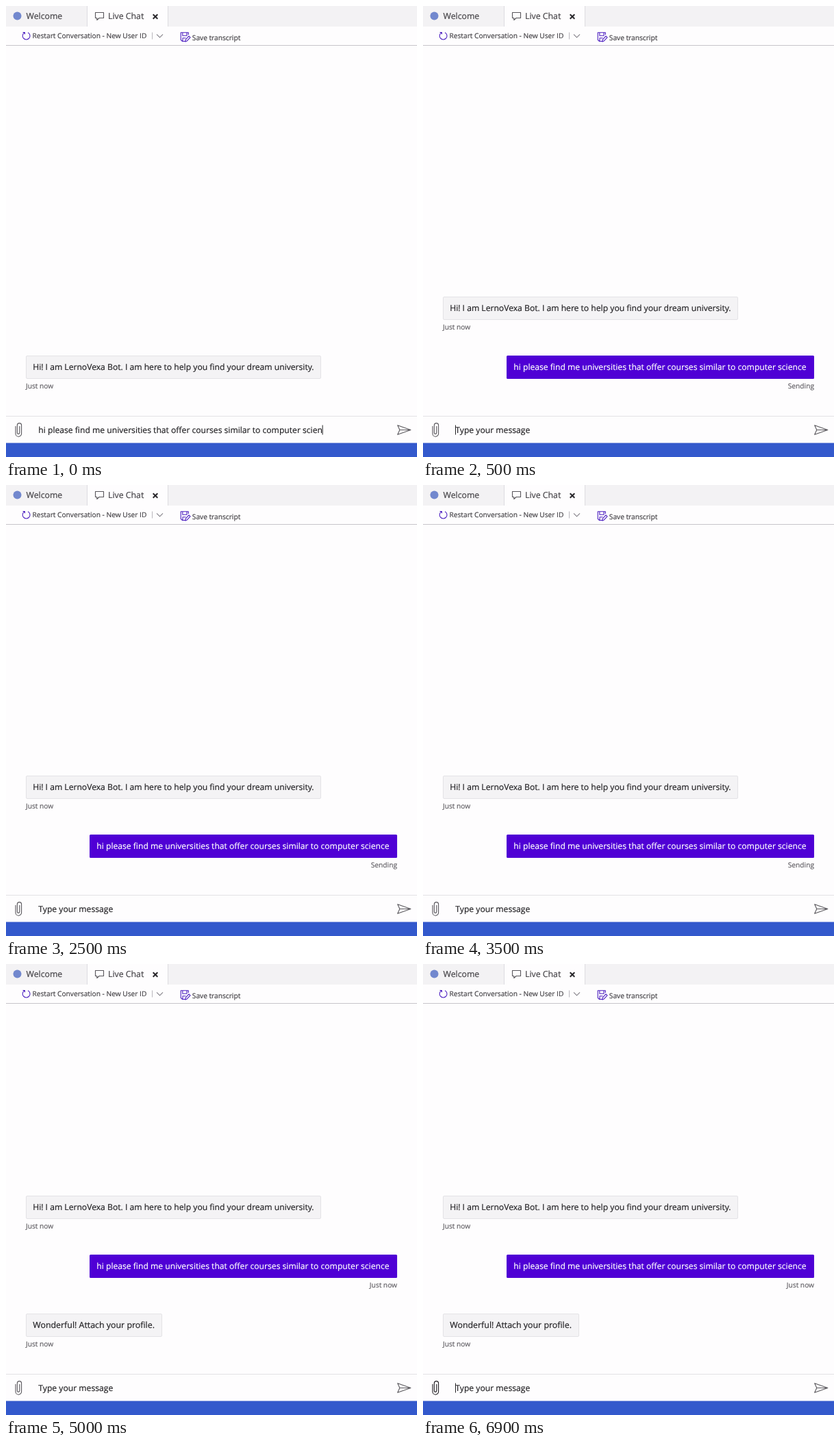
These frames come from a looping animation (600x658 px, 7000 ms). An HTML page:

```html
<!DOCTYPE html>
<html lang="en">
<head>
<meta charset="utf-8">
<title>Live chat</title>
<style>
  html, body { margin: 0; width: 100%; height: 100%; overflow: hidden; background: #fefdfe; }
  svg { display: block; width: 100%; height: 100%; }
  text { font: 12.15px "Open Sans", "Noto Sans", sans-serif; fill: #242326; stroke: #242326; stroke-width: .2; white-space: pre; text-rendering: geometricPrecision; }
  .tab { font-size: 12.3px; }
  .tool { font-size: 10.2px; }
  .tab, .tool { fill: #454347; stroke: #454347; }
  .note { font-size: 10.2px; fill: #646267; stroke: #646267; }
  .end { text-anchor: end; }
  .mine { fill: #fff; stroke: #fff; }
  .answer { font-size: 12.4px; }
  .bubble { fill: #f4f3f5; stroke: #e4e3e6; }
  .line { fill: none; stroke: #59575c; stroke-width: 1.1; stroke-linejoin: round; }
  .purple { stroke: #4c1fc0; }
</style>
</head>
<body>
<svg viewBox="0 0 600 658">
  <rect width="600" height="658" fill="#fefdfe"/>

  <!-- Tabs -->
  <rect width="600" height="30" fill="#f3f2f4"/>
  <path d="M118.5 0V30M236.5 0V30" stroke="#dddce0"/>
  <rect x="119" width="117" height="30" fill="#fefdfe"/>
  <circle cx="16.5" cy="14.5" r="6" fill="#7288ce"/>
  <text class="tab" x="29.5" y="19">Welcome</text>
  <path class="line" d="M130.5 9.5H142.5V17.5H136L132.8 20.5V17.5H130.5Z"/>
  <text class="tab" x="149" y="19">Live Chat</text>
  <path d="M214.7 12.2L221.3 18.8M221.3 12.2L214.7 18.8" stroke="#29272b" stroke-width="2"/>

  <!-- Toolbar -->
  <path class="line purple" d="M27.2 38.7A5.4 5.4 0 1 0 32 38.7M24.6 38.5H27.4V41.2"/>
  <text class="tool" x="38.5" y="47">Restart Conversation - New User ID</text>
  <path d="M213.5 38.5V48.5" stroke="#b9b7bc"/>
  <path class="line" d="M220 41.3L224.5 45.8L229 41.3" style="stroke:#85838a"/>
  <path class="line purple" d="M261 51.5H257.5L255.2 49.3V38.7H266.3V42M257.8 38.7V43.2H264V38.7M258 51.5V46.8H262.5M261.5 52L262.4 48.8L267 43.8L269 45.8L264.3 50.9Z"/>
  <text class="tool" x="271.8" y="50">Save transcript</text>
  <path d="M0 57.5H600" stroke="#c7c5ca"/>

  <!-- Conversation -->
  <g id="greeting">
    <rect class="bubble" x="29.5" y="510.5" width="430" height="33" rx="1.5"/>
    <text x="39.2" y="531">Hi! I am LernoVexa Bot. I am here to help you find your dream university.</text>
    <text class="note" x="29" y="558">Just now</text>
  </g>
  <g id="request">
    <rect x="122" y="510" width="449" height="34" rx="1.5" fill="#4f00d5"/>
    <text class="mine" id="sent" x="132.3" y="531"></text>
    <text class="note end" id="status" x="571" y="558"></text>
  </g>
  <g id="reply">
    <rect class="bubble" x="29.5" y="510.5" width="198" height="33" rx="1.5"/>
    <text class="answer" x="39.2" y="531">Wonderful! Attach your profile.</text>
    <text class="note" x="29" y="558">Just now</text>
  </g>

  <!-- Message box -->
  <path d="M0 598.5H600" stroke="#e3e2e5"/>
  <path class="line" id="clip" d="M14 613V623.9A4.3 4.3 0 0 0 22.6 623.9V611.7A3.1 3.1 0 0 0 16.4 611.7V622.7A1.7 1.7 0 0 0 19.8 622.7V613"/>
  <text id="input" x="47.3" y="623"></text>
  <rect id="caret" y="611.5" width="1" height="14" fill="#242326"/>
  <path class="line" d="M571.7 611.8L590.8 618.5L571.7 625.2L574.8 618.5ZM574.8 618.5H590"/>
  <rect y="637.5" width="600" height="20.5" fill="#3359cc"/>
</svg>
<script>
const $ = id => document.getElementById(id);
const LOOP = 7000, SEND = 500, ANSWER = 5000, HOVER = 6900, BLINK = 600, ROW = 86;
const message = "hi please find me universities that offer courses similar to computer science";

const show = (el, on) => el.setAttribute("visibility", on ? "visible" : "hidden");
const raise = (el, rows) => el.setAttribute("transform", `translate(0 ${-ROW * rows})`);
const write = (el, text) => { if (el.textContent !== text) el.textContent = text; };

write($("sent"), message);

function draw(t) {
  const sent = t >= SEND, answered = t >= ANSWER;
  const missing = Math.max(0, 2 - Math.floor(t / 100));
  const typed = message.slice(0, message.length - missing);

  raise($("greeting"), sent + answered);
  raise($("request"), +answered);
  show($("request"), sent);
  show($("reply"), answered);
  write($("status"), answered ? "Just now" : "Sending");

  write($("input"), sent ? "Type your message" : typed);
  $("caret").setAttribute("x", sent ? 47 : 47 + $("input").getComputedTextLength());
  show($("caret"), !sent || Math.floor((t - SEND) / BLINK) % 2 === 0);
  $("clip").style.stroke = t >= HOVER ? "#1f1d21" : "";
}

const start = performance.now();
function tick() {
  draw((performance.now() - start) % LOOP);
  requestAnimationFrame(tick);
}
tick();
</script>
</body>
</html>
```
